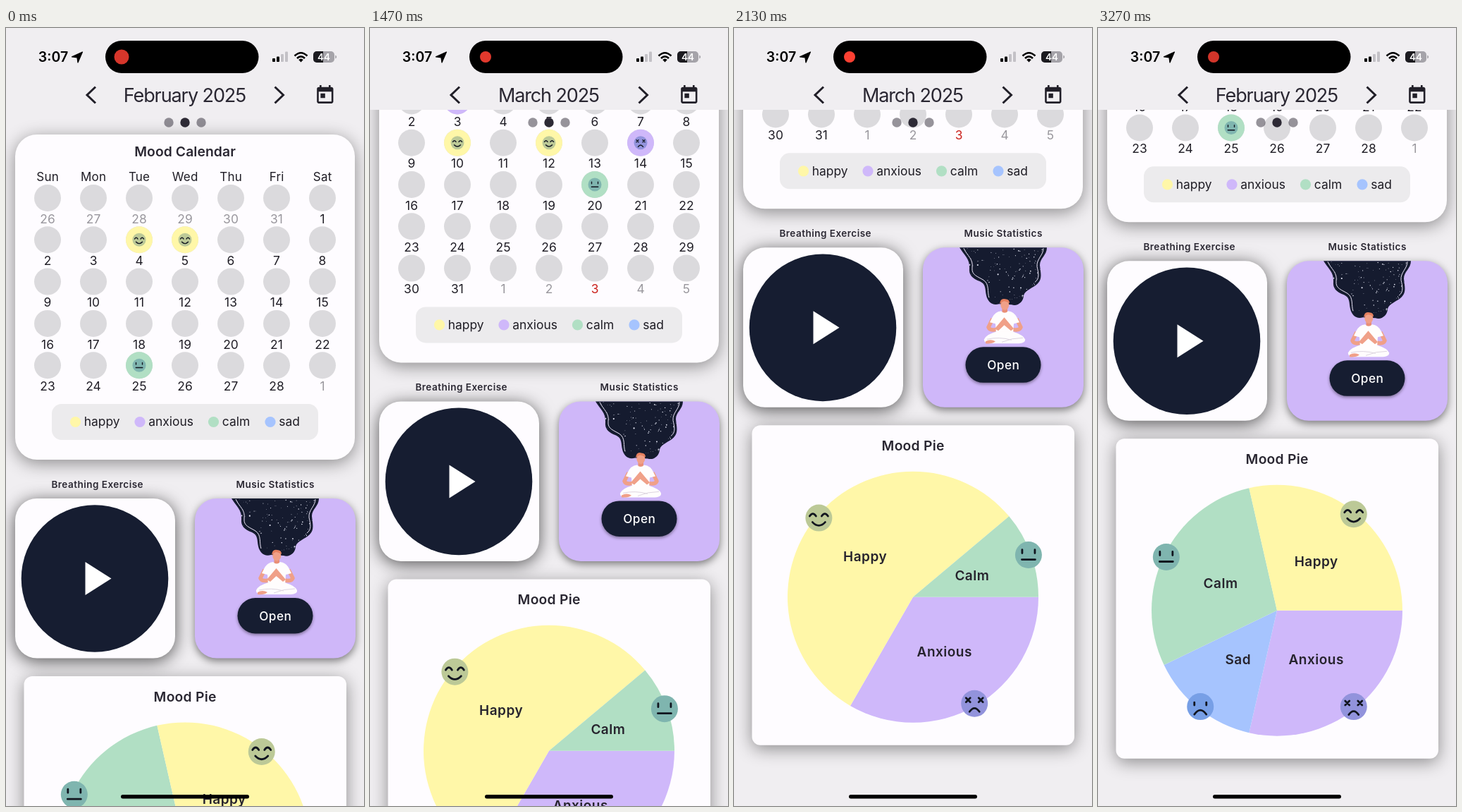
An HTML page that plays this animation: 508x1103 px, repeating every 3.34 s.

```html
<!DOCTYPE html>
<html lang="en">
<head>
<meta charset="utf-8">
<title>Mood tracker</title>
<style>
html, body { margin: 0; width: 100%; height: 100%; overflow: hidden; background: #f0eef1; }
svg { display: block; width: 100vw; height: 100vh; }
text { font-family: Inter, Roboto, sans-serif; font-optical-sizing: none; fill: #1f1d25; white-space: pre; }
.mood { opacity: var(--p, 1); }
.card { fill: #fefcff; }
.soft { filter: drop-shadow(0 5px 12px rgba(0, 0, 0, .42)); }
.deep { filter: drop-shadow(0 4px 12px rgba(0, 0, 0, .66)); }
.low { filter: drop-shadow(0 4px 6px rgba(0, 0, 0, .5)); }
.line { fill: none; stroke: #11151f; stroke-width: 2.8; stroke-linecap: round; stroke-linejoin: round; }
</style>
</head>
<body>
<svg id="stage" viewBox="0 0 508 1103" preserveAspectRatio="none">
  <defs>
    <path id="hair" d="M320 667H444C444 678 434 682 434 692C435 703 438 711 431 718C424 725 413 727 411 735C411 744 402 751 394 748L376 747C367 750 360 744 358 735C356 726 358 719 349 715C338 711 333 706 334 696C335 683 326 677 320 667Z"/>
    <clipPath id="hairClip"><use href="#hair"/></clipPath>
    <clipPath id="barClip"><rect y="78.5" width="508" height="37.5"/></clipPath>
  </defs>
  <rect width="508" height="1103" fill="#f0eef1"/>
  <g id="page">
    <rect id="calCard" class="card soft" x="13" y="151" width="482" height="461" rx="31"/>
    <g id="calHead"></g>
    <g id="febCal"></g>
    <g id="marCal"></g>
    <g id="lower">
      <g id="legend"><rect x="65" y="533" width="378" height="51" rx="14" fill="#ecebed"/></g>
      <rect class="card deep" x="13" y="667" width="227" height="226.5" rx="31"/>
      <circle cx="126" cy="780.5" r="104.3" fill="#161d31"/>
      <path d="M112.500 757L149.500 780.500L112.500 804Z" fill="#fff"/>
      <rect class="low" x="268" y="667" width="228" height="226.500" rx="31" fill="#cfb7f9"/>
      <use href="#hair" fill="#151b2f"/>
      <g id="stars" clip-path="url(#hairClip)"></g>
      <path d="M326 668C331 679 340 683 338 696C337 706 346 708 354 713C363 719 359 730 362 738M439 668C439 678 429 683 430 694C432 703 434 711 427 716" fill="none" stroke="#e9e4f5" stroke-width="1"/>
      <g id="sitter">
        <path d="M380.500 751H388V763H380.500Z" fill="#e98f76"/>
        <ellipse cx="384.300" cy="748" rx="6" ry="7.500" fill="#f0a088"/>
        <path d="M377 747Q378 738 385 740Q391 740 391 746Q386 743 383 743Q380 744 377 747Z" fill="#e5805f"/>
        <path d="M367 768L361 780Q363 785 372 783M401 768L407 780Q405 785 396 783" fill="none" stroke="#f0a088" stroke-width="5.500" stroke-linejoin="round"/>
        <path d="M379 757Q384 762 389 757Q398 758 402 767L405 773L397 775L396 789H372L371 775L363 773L366 767Q370 758 379 757Z" fill="#fffdfd"/>
        <path d="M370 782L383.500 766L397 782L393 785L383.500 777L375 785Z" fill="#f0a088"/>
        <path d="M373 786H395Q411 791 413 797Q414 803 401 803H366Q354 803 355 797Q358 790 373 786Z" fill="#fffdfd"/>
        <path d="M359 797Q376 793 394 798M410 795Q394 795 380 801" fill="none" stroke="#ddd5e0" stroke-width="1"/>
        <path d="M357 800Q364 796 371 800Q366 804 357 803Z" fill="#f0a088"/>
      </g>
      <rect x="328.500" y="808" width="107" height="50.500" rx="25.250" fill="#161d31" style="filter:drop-shadow(0 2px 2px rgba(0,0,0,.4))"/>
      <rect class="card soft" x="25.500" y="919" width="457.500" height="453.500" rx="12"/>
      <g id="labels"></g>
      <g id="pie"></g>
    </g>
  </g>

  <rect width="508" height="116" fill="#f0eef1"/>
  <g clip-path="url(#barClip)" fill="#2d2a35">
    <circle id="rippleL" cx="121" cy="95" r="30"/>
    <circle id="rippleR" cx="387" cy="95" r="30"/>
  </g>
  <g id="header"></g>
  <path d="M127 83.500L115 95L127 106.500M381.500 83.500L393.500 95L381.500 106.500" fill="none" stroke="#211f28" stroke-width="3"/>
  <path transform="translate(437.300 79.800) scale(1.293)" fill="#211f28" d="M19 3h-1V1h-2v2H8V1H6v2H5c-1.100 0-2 .9-2 2v14c0 1.100.9 2 2 2h14c1.100 0 2-.9 2-2V5c0-1.100-.9-2-2-2zm0 16H5V8h14v11zM7 10h5v5H7z"/>
  <g fill="#2d2a35">
    <circle cx="231" cy="134" r="6.700" fill-opacity=".5"/>
    <circle cx="254" cy="134" r="6.700"/>
    <circle cx="277" cy="134" r="6.700" fill-opacity=".5"/>
  </g>
  <rect x="141" y="18" width="217.500" height="46" rx="23"/>
  <circle id="rec" cx="164" cy="41" r="8" fill="#fc4032"/>
  <path d="M108.500 34L93.500 40.800L101 41.800L102 49Z" stroke="#000" stroke-width="1.200" stroke-linejoin="round"/>
  <rect x="378" y="43" width="4" height="5" rx="1"/>
  <rect x="384" y="40.500" width="4" height="7.500" rx="1"/>
  <rect x="390" y="37" width="4" height="11" rx="1" fill="#c3c1c6"/>
  <rect x="396" y="33.500" width="4" height="14.500" rx="1" fill="#c3c1c6"/>
  <path d="M409.500 39.500Q418.500 31 427.500 39.500M413 43Q418.500 37.800 424 43" fill="none" stroke="#000" stroke-width="2.600"/>
  <path d="M415.200 45Q418.500 42 421.800 45L418.500 48.500Z"/>
  <rect x="436" y="33" width="30" height="16" rx="5" fill="#a5a3a9"/>
  <path d="M450 33H441a5 5 0 0 0-5 5v6a5 5 0 0 0 5 5h9Z" fill="#1c1b20"/>
  <path d="M467.200 38.500q2 .6 2 2.500t-2 2.500z" fill="#a5a3a9"/>
  <g id="status"></g>
  <rect x="163" y="1087" width="182" height="5.500" rx="2.750"/>
</svg>
<script>
const LOOP = 3340, ROW = 59.3, SWITCH_DAY = 150;
const TO_MARCH = 260, TO_FEB = 2553;
const $ = id => document.getElementById(id);
const mix = (a, b, p) => a + (b - a) * p;
const clamp = v => Math.max(0, Math.min(1, v));
const rgb = c => `rgb(${c.map(Math.round)})`;

const MOODS = {
  happy: { color: [255, 247, 168], face: '#bcc997',
    art: 'M-13-2.500q4.500-7 9 0M4-2.500q4.500-7 9 0M-9 6q9 9.500 18 0' },
  anxious: { color: [207, 184, 250], face: '#9293dc',
    art: 'M-12-8l6 6m0-6l-6 6M6-8l6 6m0-6l-6 6M-7 11.500q7-10 14 0' },
  calm: { color: [177, 223, 196], face: '#7fb5af',
    art: 'M-9-7.500v5M9-7.500v5M-9.500 6.500h19' },
  sad: { color: [166, 196, 254], face: '#779fe6',
    art: 'M-8.500-6v4M8.500-6v4M-8.500 11q8.500-12 17 0' }
};

// y is the middle of the capitals
function text(x, y, s, size, o = {}) {
  const { w = 400, ls = 0, fill = '#1f1d25', anchor = 'middle' } = o;
  return `<text x="${x + (anchor === 'middle' ? ls / 2 : 0)}" y="${y + size * .3635}" text-anchor="${anchor}" ` +
    `style="font-size:${size}px;font-weight:${w};letter-spacing:${ls}px;fill:${fill}">${s}</text>`;
}

function face(mood, x, y, k = 1) {
  const m = MOODS[mood];
  return `<g transform="translate(${x} ${y}) scale(${k})"><circle r="19" fill="${m.face}"/>` +
    `<path class="line" d="${m.art}"/></g>`;
}

function calendar(rows, first, prevDays, days, marks, today) {
  let out = '';
  for (let i = 0; i < rows * 7; i++) {
    const x = 59 + 65 * (i % 7), y = 241 + ROW * Math.floor(i / 7);
    let n = first + i, muted = true;
    if (n > prevDays) {
      n -= prevDays;
      muted = n > days;
      if (muted) n -= days;
    }
    out += `<circle cx="${x}" cy="${y}" r="19" fill="#dbdadd"/>`;
    const mood = marks[i];
    if (mood) {
      out += `<circle class="mood" cx="${x}" cy="${y}" r="19" fill="${rgb(MOODS[mood].color)}"/>` + face(mood, x, y, .5);
    }
    const fill = i === today ? '#cb221d' : muted ? '#99979d' : '#1f1d25';
    out += text(x, y + 29.3, n, 17.4, { fill, ls: .1 });
  }
  return out;
}

const bold = { w: 600, ls: .1, fill: '#2a2732' };
const small = { w: 600, ls: .48, fill: '#2a2732' };
$('calHead').innerHTML = text(254, 175, 'Mood Calendar', 19.3, bold) +
  ['Sun', 'Mon', 'Tue', 'Wed', 'Thu', 'Fri', 'Sat'].map((d, i) => text(59 + 65 * i, 211, d, 17, { ls: .2 })).join('');
$('febCal').innerHTML = calendar(5, 26, 31, 28, { 9: 'happy', 10: 'happy', 30: 'calm' });
$('marCal').innerHTML = calendar(6, 23, 28, 31,
  { 8: 'anxious', 15: 'happy', 17: 'happy', 19: 'anxious', 25: 'calm' }, 39);
$('legend').innerHTML += [['happy', 98.5], ['anxious', 190], ['calm', 294.5], ['sad', 375]].map(([m, x]) =>
  `<circle cx="${x}" cy="558.5" r="7.6" fill="${rgb(MOODS[m].color)}"/>` +
  text(x + 12.3, 558, m, 17.4, { anchor: 'start' })).join('');
$('labels').innerHTML = text(129.5, 647, 'Breathing Exercise', 13.5, small) +
  text(382, 647, 'Music Statistics', 13.5, small) +
  text(382, 833.5, 'Open', 17.2, { w: 500, ls: .5, fill: '#fff' }) +
  text(254, 948, 'Mood Pie', 19.3, { ...bold, ls: .25 });
$('status').innerHTML = text(67, 41, '3:07', 19.5, { w: 600, fill: '#000' }) +
  text(451, 41, '44', 13.5, { w: 600, fill: '#fff' });

let seed = 7;
const rnd = () => (seed = seed * 16807 % 2147483647) / 2147483647;
let dots = '';
for (let i = 0; i < 150; i++) {
  dots += `<circle cx="${(322 + rnd() * 120).toFixed(1)}" cy="${(668 + rnd() * 76).toFixed(1)}" r="${(.3 + rnd() * rnd() * .8).toFixed(2)}" fill="#e6e8f5"/>`;
}
$('stars').innerHTML = dots;

// Smooth curve through [time, offset] points
const SCROLL = [[1160, 0], [1330, 90], [1600, 294], [1730, 356], [1870, 393], [2000, 410], [2130, 415], [2300, 402], [2450, 396]];
function scrollAt(t) {
  const k = SCROLL, last = k.length - 1;
  if (t <= k[0][0]) return 0;
  if (t >= k[last][0]) return k[last][1];
  const slope = i => i === 0 || i === last ? 0 : (k[i + 1][1] - k[i - 1][1]) / (k[i + 1][0] - k[i - 1][0]);
  const i = k.findIndex(p => p[0] > t) - 1;
  const [t0, a] = k[i], [t1, b] = k[i + 1], d = t1 - t0, u = (t - t0) / d;
  return mix(a, b, u * u * (3 - 2 * u)) + d * u * (1 - u) * ((1 - u) * slope(i) - u * slope(i + 1));
}

const FEB = [['anxious', 2], ['sad', 1], ['calm', 2], ['happy', 2]];
const MARCH = [['anxious', 3], ['happy', 5], ['calm', 1]];
function pie(from, to, p) {
  const cx = 254, cy = 1162.4, R = 178;
  const at = (a, r) => [cx + r * Math.cos(a), cy + r * Math.sin(a)];
  const parts = to.map(([mood, v], i) => {
    const [m0, v0] = from[i] || to[i];
    return { mood, v: mix(v0, v, p), color: MOODS[m0].color.map((c, j) => mix(c, MOODS[mood].color[j], p)) };
  });
  const total = parts.reduce((s, q) => s + q.v, 0);
  let a = 0, slices = '', over = '';
  for (const { mood, v, color } of parts) {
    const sweep = v / total * Math.PI * 2, mid = a + sweep / 2;
    slices += `<path d="M${cx} ${cy}L${at(a, R)}A${R} ${R} 0 ${+(sweep > Math.PI)} 1 ${at(a + sweep, R)}Z" fill="${rgb(color)}"/>`;
    const name = mood[0].toUpperCase() + mood.slice(1);
    over += text(...at(mid, R / 2), name, 19, { w: 600, ls: .5, fill: '#26232d' }) + face(mood, ...at(mid, R * .98));
    a += sweep;
  }
  return slices + over;
}

// Button highlight around a tap released at time `up`
const ripple = (t, up) => .13 * clamp((t - up + 90) / 70) * (1 - clamp((t - up - 140) / 220));

let lastPie = '', lastTitle = '';
function render(t) {
  const march = t >= TO_MARCH && t < TO_FEB;
  const p = t < TO_MARCH ? 1 : clamp((t - (march ? TO_MARCH : TO_FEB)) / SWITCH_DAY);
  const grow = march ? ROW : 0;
  const y = scrollAt(t) - (t >= TO_FEB ? ROW : 0);
  $('page').setAttribute('transform', `translate(0 ${-y})`);
  $('lower').setAttribute('transform', `translate(0 ${grow})`);
  $('calCard').setAttribute('height', 461 + grow);
  $('febCal').style.display = march ? 'none' : '';
  $('marCal').style.display = march ? '' : 'none';
  $('stage').style.setProperty('--p', p);

  const key = march + ':' + p;
  if (key !== lastPie) {
    $('pie').innerHTML = march ? pie(FEB, MARCH, p) : pie(MARCH, FEB, p);
    lastPie = key;
  }
  const title = march ? 'March 2025' : 'February 2025';
  if (title !== lastTitle) {
    $('header').innerHTML = text(254, 95, title, 27, { ls: -1.12, fill: '#2a2732' });
    lastTitle = title;
  }
  $('rippleR').setAttribute('opacity', ripple(t, TO_MARCH));
  $('rippleL').setAttribute('opacity', ripple(t, TO_FEB));

  const dim = Math.max(0, Math.cos((t - 1600) / 1670 * Math.PI * 2)) ** 4;
  $('rec').setAttribute('r', mix(10.5, 8, clamp(t / 250)));
  $('rec').setAttribute('opacity', 1 - .17 * dim);
}

const start = performance.now();
function tick() {
  render((performance.now() - start) % LOOP);
  requestAnimationFrame(tick);
}
tick();
</script>
</body>
</html>
```
